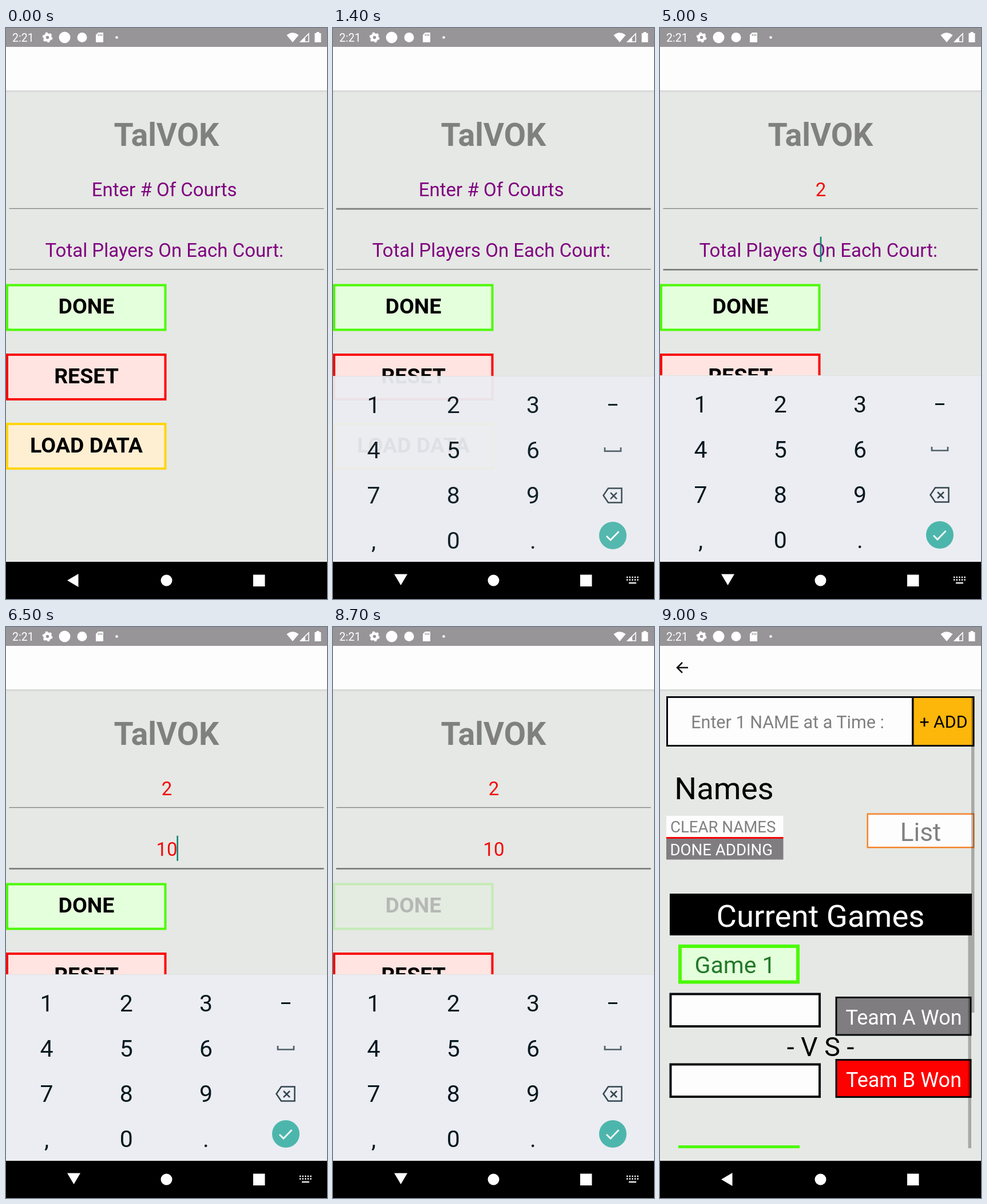
An HTML page that plays this animation: 561 px wide and 998 px high, repeating every 9.1 s.

```html
<!DOCTYPE html>
<html lang="en">
<head>
<meta charset="utf-8">
<title>Court setup</title>
<style>
html, body { margin: 0; width: 100%; height: 100%; overflow: hidden; background: #e5e8e4; }
svg { display: block; width: 100%; height: 100%; font-family: Roboto, sans-serif; }
</style>
</head>
<body>
<svg id="stage" viewBox="0 0 561 998"></svg>
<script>
const GREEN = '#4cfa04', GRAY = '#807d80';

const text = (str, x, y, size, fill, extra = 'text-anchor="middle"') =>
  `<text x="${x}" y="${y}" font-size="${size}" fill="${fill}" ${extra}>${str}</text>`;
const rect = (x, y, w, h, fill, extra = '') =>
  `<rect x="${x}" y="${y}" width="${w}" height="${h}" fill="${fill}" ${extra}/>`;
// The border lies inside the given bounds.
const box = (x, y, w, h, fill, line, b) =>
  rect(x + b / 2, y + b / 2, w - b, h - b, fill, `stroke="${line}" stroke-width="${b}"`);
const dot = (x, y, r, fill) => `<circle cx="${x}" cy="${y}" r="${r}" fill="${fill}"/>`;
const path = (d, fill, stroke = 'none', width = 0) =>
  `<path d="${d}" fill="${fill}" stroke="${stroke}" stroke-width="${width}"/>`;
const group = (id, ...parts) => `<g id="${id}">${parts.join('')}</g>`;
const bold = 'text-anchor="middle" font-weight="700"';
const left = 'text-anchor="start"';

const button = (id, label, y, fill, line) => group(id,
  box(0, y, 280.5, 82, fill, line, 4), text(label, 140.5, y + 51.5, 37.5, '#000', bold));

const form = group('form',
  text('TalVOK', 280.5, 206, 55.5, '#808080', bold),
  group('fields'),
  button('done', 'DONE', 447.5, '#e4ffdb', GREEN),
  button('reset', 'RESET', 569, '#ffe4e1', '#f90404'),
  button('load', 'LOAD DATA', 690, '#ffefd2', '#ffd504'));

const keys = ['123', '456', '789', ',0.'].map((row, r) =>
  [...row].map((key, c) => text(key, 71 + 139.2 * c, 672 + 79 * r, 41, '#06181f')).join('')).join('');

const keyboard = group('keyboard',
  rect(0, 607, 561, 400, '#dfe2e3'), rect(0, 608, 561, 400, '#ebedf2'), keys,
  rect(481, 656, 16, 3, '#06181f'),
  path('M475 732V738.5H503V732', 'none', '#4f5f68', 2.7),
  path('M481 803.5H504.5V828.5H481L472.5 816Z M485 811L496 822M496 811L485 822', 'none', '#34464f', 2.5),
  dot(489, 886, 24, '#4db6ac'),
  path('M478 887L485 894L499.5 879', 'none', '#fff', 2.7));

const games = group('games',
  path('M49 71H30M39 62L30 71L39 80', 'none', '#111', 2.5),
  box(11, 121, 432, 88, '#fefdfe', '#05080c', 3),
  text('Enter 1 NAME at a Time :', 223, 177, 30.5, '#808080'),
  box(440.5, 121, 109, 88, '#fdb60a', '#05080c', 3),
  text('+ ADD', 495.5, 176, 30.3, '#000'),
  text('Names', 112, 301, 54.5, '#000'),
  rect(11, 330, 204.5, 37, '#fefdfe'), text('CLEAR NAMES', 18, 359, 27.6, '#808080', left),
  rect(11, 367, 204.5, 3, '#f90404'), rect(11, 370, 204.5, 36.5, GRAY),
  text('DONE ADDING', 17.5, 398.5, 27.6, '#fff', left),
  box(361.5, 325.5, 188, 61, '#fefdfe', '#f5842a', 2.5), text('List', 455.5, 374, 44, '#808080'),
  rect(17, 466, 528, 73, '#000'), text('Current Games', 280.5, 524, 54.5, '#fff'),
  box(32, 555, 212, 68.5, '#e4ffdb', GREEN, 6), text('Game 1', 60.5, 605, 41, '#23792b', left),
  box(16.5, 639.5, 264.5, 60.5, '#fefdfe', '#05080c', 4),
  box(16.5, 762.5, 264.5, 60.5, '#fefdfe', '#05080c', 4),
  box(306.5, 646, 238, 68.5, GRAY, '#05080c', 3), text('Team A Won', 426, 695, 36, '#fff'),
  box(306.5, 755, 238, 68, '#fd0000', '#05080c', 3), text('Team B Won', 426, 803.5, 36, '#fff'),
  text('- V S -', 280.5, 749.5, 46.5, '#000'),
  rect(32, 906, 212, 5, GREEN),
  rect(544, 121, 5.5, 553, '#000', 'opacity=".27"'),
  rect(538.5, 539, 5.5, 372, '#000', 'opacity=".27"'));

const status = group('status',
  rect(0, 0, 561, 33, '#989598'), text('2:21', 11, 23.5, 19.5, '#fff', left),
  '<circle cx="72.5" cy="16.5" r="5" fill="none" stroke="#fff" stroke-width="4.5"/>',
  '<circle cx="72.5" cy="16.5" r="7.7" fill="none" stroke="#fff" stroke-width="2.4" stroke-dasharray="4 4.06"/>',
  dot(102.5, 16.5, 10, '#fff'), dot(133, 16.5, 8.5, '#fff'),
  path('M161 8H170V25H157V12Z', '#fff'),
  path('M161.5 10.5V14M164.5 10.5V14M167.5 10.5V14', 'none', '#989598', 1.4),
  dot(193.5, 16.5, 2.3, '#fff'),
  path('M490.5 12.5Q501 4 511.5 12.5L501 25Z', '#fff'),
  path('M515 24H529V10Z', 'none', '#fff', 1.6), path('M513 25H523V15Z', '#fff'),
  path('M539.5 9H542.5V7H547.5V9H550.5V25H539.5Z', '#fff'));

const nav = group('nav',
  rect(0, 933, 561, 65, '#000'),
  group('back', path('M107 965.5L126.5 954V977Z', '#fff')),
  group('hide', path('M107 954.5H130L118.5 974Z', '#fff'),
    path('M513 960H534M513 964.5H534', 'none" stroke-dasharray="2.4 2.2', '#fff', 2.4),
    path('M517 970H530', 'none', '#fff', 2.2)),
  dot(280.5, 965.5, 10, '#fff'), rect(432, 955.5, 20.5, 20.5, '#fff'));

const stage = document.getElementById('stage');
stage.innerHTML = rect(0, 0, 561, 998, '#e5e8e4') +
  rect(0, 108, 561, 3, '#d4d6d4') + rect(0, 111, 561, 2, '#e0e3df') + rect(0, 33, 561, 76, '#fefdfe') +
  form + keyboard + games + status + nav;

const el = id => document.getElementById(id);
const show = (id, on) => el(id).setAttribute('display', on ? 'inline' : 'none');
const clamp = v => Math.min(1, Math.max(0, v));

const LOOP = 9100, TAP = 1200, SECOND = 4800, PRESS = 8500, OPEN = 8900;
const fields = [
  { y: 294, hint: 'Enter # Of Courts', typed: [[2400, '2']], from: TAP, to: SECOND, caret: 1500 },
  { y: 400.3, hint: 'Total Players On Each Court:', typed: [[5900, '1'], [6200, '10']],
    from: SECOND, to: OPEN, caret: SECOND }
];

function drawField({ y, hint, typed, from, to, caret }, t) {
  const entry = typed.filter(([at]) => t >= at).pop();
  const value = entry ? entry[1] : '';
  const focused = t >= from && t < to;
  const since = t - (entry ? entry[0] : caret);
  const caretX = value ? 281.3 + 9.2 * value.length : 281;
  const caretOn = focused && since >= 0 && since % 1000 < 500;
  return text(value || hint, value ? 281 : 276.7, y, 33, value ? '#f40808' : '#800080') +
    rect(5.5, y + (focused ? 20.7 : 20.9), 550, focused ? 2.8 : 1.3, '#7f7f7f') +
    (caretOn ? rect(caretX - 1.3, y - 35.5, 2.6, 44, '#128478') : '');
}

function draw(now) {
  const t = now % LOOP;
  const typing = t >= TAP && t < OPEN;
  const rise = 1 - (1 - clamp((t - TAP) / 260)) ** 2;
  show('form', t < OPEN);
  show('games', t >= OPEN);
  show('keyboard', typing);
  show('hide', typing);
  show('back', !typing);
  el('keyboard').setAttribute('opacity', rise);
  el('keyboard').setAttribute('transform', `translate(0 ${20 * (1 - rise)})`);
  el('done').setAttribute('opacity', 1 - 0.8 * clamp((t - PRESS) / 150));
  el('fields').innerHTML = fields.map(f => drawField(f, t)).join('');
  requestAnimationFrame(() => draw(performance.now() - start));
}

const start = performance.now();
draw(0);
</script>
</body>
</html>
```
